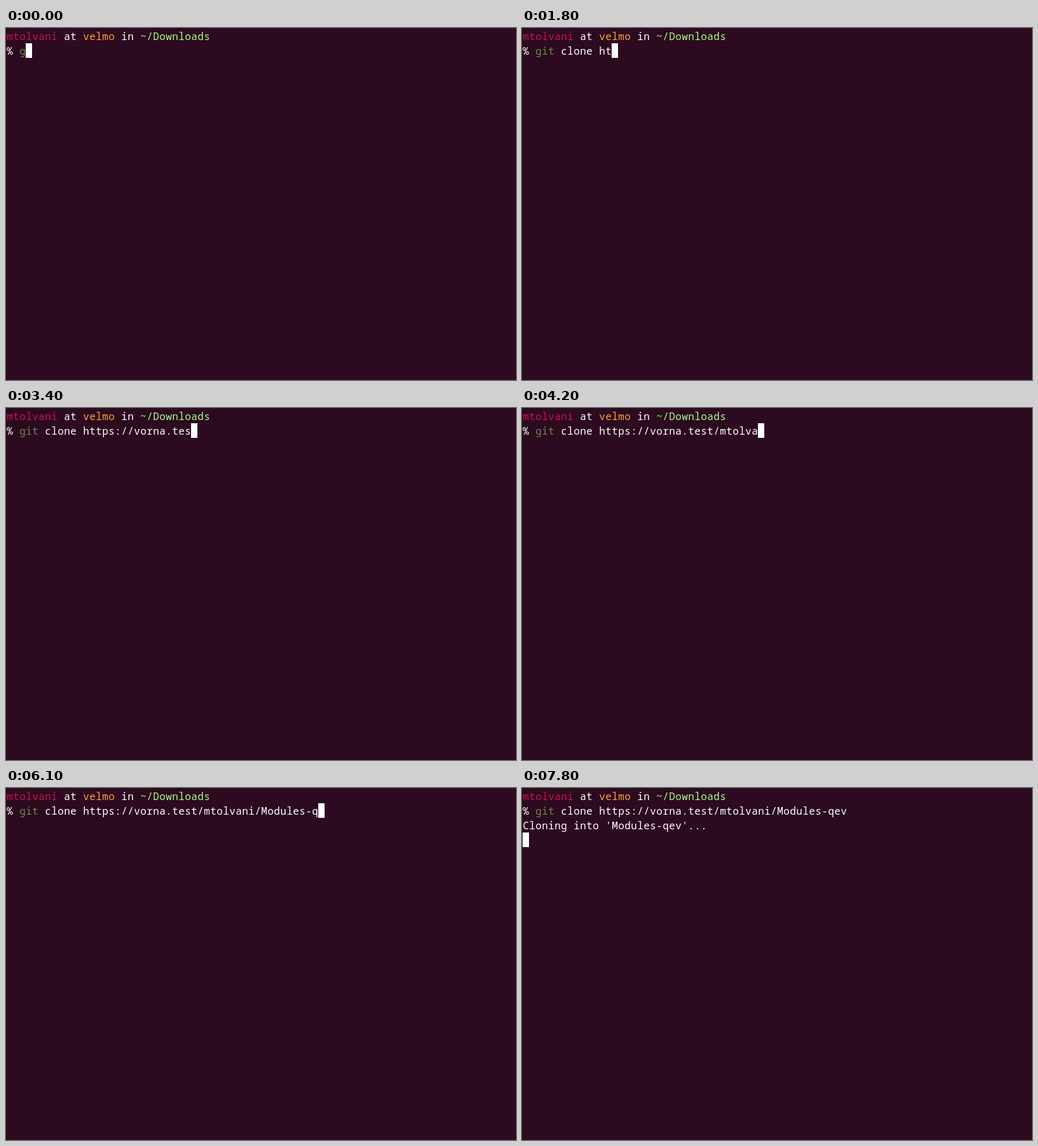
An HTML page with a canvas for the animation above (8 s loop, 802 by 554 pixels).

```html
<!DOCTYPE html>
<html lang="en">
<head>
<meta charset="utf-8">
<title>Terminal</title>
<style>
html, body { margin: 0; width: 100%; height: 100%; overflow: hidden; background: #2c0a1f; }
canvas { display: block; }
</style>
</head>
<body>
<canvas id="stage" width="802" height="554"></canvas>
<script>
const canvas = document.getElementById('stage');
const ctx = canvas.getContext('2d', { alpha: false });

const LOOP = 8000, TICK = 100;
const CELL_W = 10, CELL_H = 23, MARGIN = 1, BASELINE = 18;
const FONT = '16px "Noto Sans Mono", monospace';
const BACK = '#2c0a1f', WHITE = '#ffffff', RED = '#cf1257';
const ORANGE = '#ffa23f', LIME = '#abfa8c', GREEN = '#6a8c4c';

const USER = 'mtolvani', HOST = 'velmo', REPO = 'Modules-qev';
const PROMPT = [[USER, RED], [' at ', WHITE], [HOST, ORANGE], [' in ', WHITE], ['~/Downloads', LIME]];

// Each burst is typed at an even pace from start to end.
const BURSTS = [
  ['git', -100, 300],
  [' clone', 600, 1200],
  [' h', 1200, 1600],
  ['ttps:', 1700, 2200],
  ['//', 2200, 2500],
  ['vorna.', 2600, 3000],
  ['test', 3000, 3500],
  ['/mt', 3600, 3800],
  ['olvani', 3900, 4300],
  ['/', 4700, 4800],
  ['Mo', 5100, 5200],
  ['d', 5200, 5300],
  ['ules', 5400, 5700],
  ['-qev', 5800, 6300]
];
const ENTER = 6600, REPLY = 6700, BLINK_OFF = 7100, BLINK_ON = 7800;

const cellX = col => MARGIN + col * CELL_W;
const cellY = row => MARGIN + row * CELL_H;

function write(text, col, row, color) {
  ctx.fillStyle = color;
  [...text].forEach((ch, i) =>
    ctx.fillText(ch, cellX(col + i + 0.5), cellY(row) + BASELINE));
  return col + text.length;
}

function cursor(col, row) {
  ctx.fillStyle = WHITE;
  ctx.fillRect(cellX(col), cellY(row), CELL_W, CELL_H);
}

function typedAt(t) {
  return BURSTS.map(([text, start, end]) => {
    const count = Math.floor(text.length * (t - start) / (end - start));
    return text.slice(0, Math.max(0, count));
  }).join('') || BURSTS[0][0][0];
}

function draw(t) {
  ctx.fillStyle = BACK;
  ctx.fillRect(0, 0, canvas.width, canvas.height);
  ctx.font = FONT;
  ctx.textAlign = 'center';

  let col = 0;
  for (const [text, color] of PROMPT) col = write(text, col, 0, color);

  const typed = typedAt(t);
  col = write('% ', 0, 1, WHITE);
  col = write(typed.slice(0, 3), col, 1, GREEN);
  col = write(typed.slice(3), col, 1, WHITE);

  if (t < ENTER) {
    cursor(col, 1);
  } else if (t < REPLY) {
    cursor(0, 2);
  } else {
    write(`Cloning into '${REPO}'...`, 0, 2, WHITE);
    if (t < BLINK_OFF || t >= BLINK_ON) cursor(0, 3);
  }
}

function frame() {
  const t = performance.now() % LOOP;
  draw(Math.floor(t / TICK) * TICK);
  requestAnimationFrame(frame);
}
frame();
</script>
</body>
</html>
```
